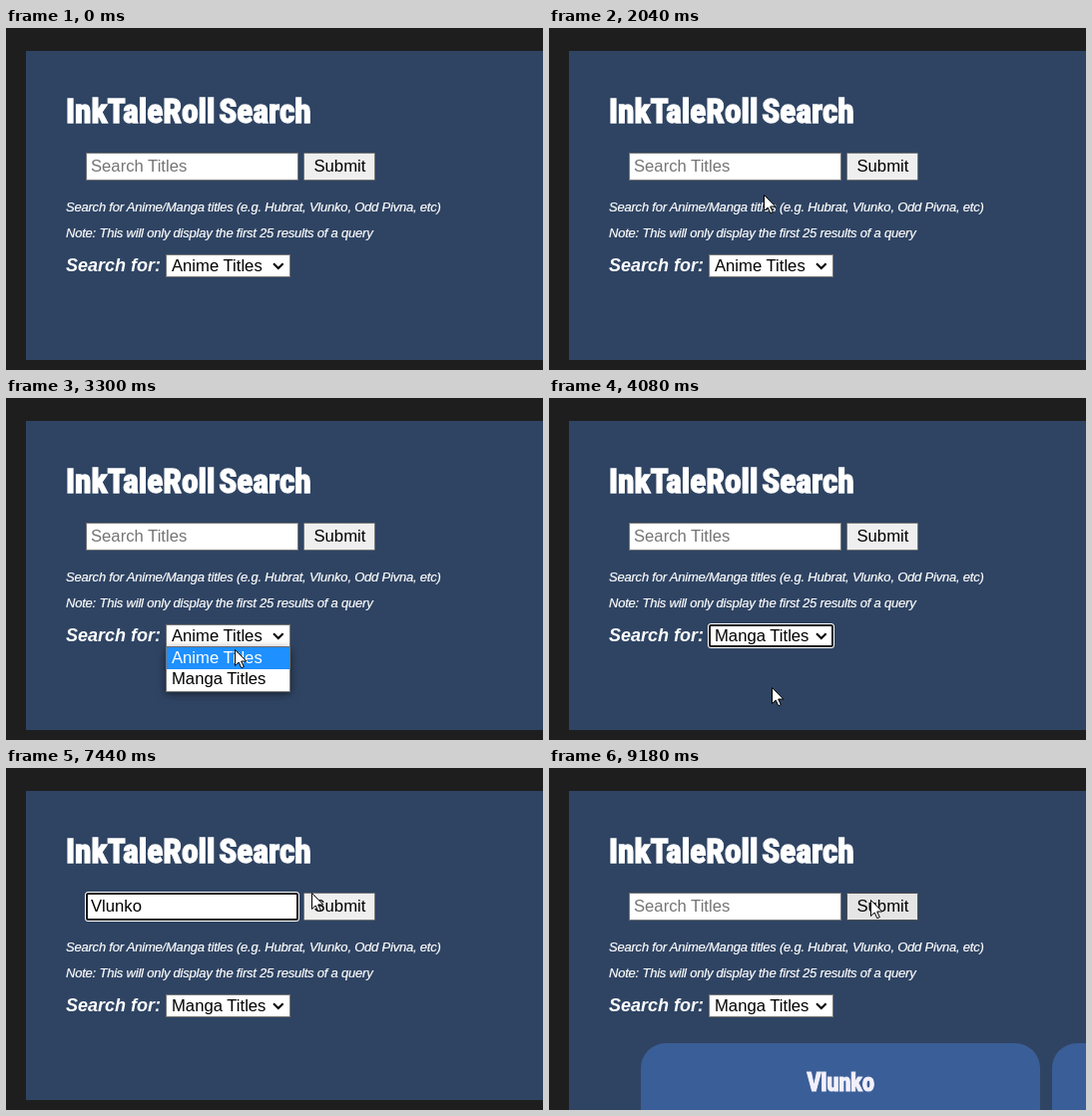
Animation of 538x343 px, one loop 9.54 s. Source, as an HTML page:

```html
<!DOCTYPE html>
<html lang="en">
<head>
<meta charset="utf-8">
<title>Search form</title>
<style>
  html, body { margin: 0; width: 100%; height: 100%; overflow: hidden; background: #1e1e1e; }
  svg { display: block; width: 538px; height: 343px; }
  text { font: 16.67px "Liberation Sans", Arial, sans-serif; white-space: pre; }
  .head { font: 900 33.5px "Roboto Condensed", Roboto, sans-serif; font-stretch: 75%;
    word-spacing: -4px; fill: #fff; stroke: #fff; stroke-width: 1.4px; }
  .card { font-size: 25px; letter-spacing: -.4px; text-anchor: middle;
    fill: #f3f0fd; stroke: #f3f0fd; stroke-width: 1px; }
  .note { font-size: 13px; font-style: italic; letter-spacing: -.21px;
    fill: #fff; stroke: #fff; stroke-width: .2px; }
  .label { font-size: 18px; font-style: italic; font-weight: bold; fill: #fff; }
  .field { fill: #fff; stroke: #767676; }
  .shadow { filter: drop-shadow(0 2px 4px rgba(0, 0, 0, .5)); }
</style>
</head>
<body>
<svg viewBox="0 0 538 343">
  <rect width="538" height="343" fill="#1e1e1e"/>
  <rect id="panel" x="20" y="23" width="518" height="310" fill="#2f4463"/>
  <text class="head" x="60" y="95">InkTaleRoll Search</text>

  <rect id="input" class="field" x="80.5" y="125.5" width="212" height="27"/>
  <g id="inputRing">
    <rect x="79" y="124" width="215" height="30" rx="3.5" fill="#fff"/>
    <rect x="81" y="126" width="211" height="26" rx="1.5" fill="#fff" stroke="#101010" stroke-width="2"/>
  </g>
  <text id="hint" x="85" y="144" fill="#757575">Search Titles</text>
  <text id="typed" x="85" y="144"></text>
  <rect id="caret" x="85" y="130" width="1" height="19"/>

  <rect id="button" class="field" x="298.5" y="125.5" width="71" height="27" rx="1"/>
  <text x="308.5" y="144">Submit</text>

  <text class="note" x="60" y="184">Search for Anime/Manga titles (e.g. Hubrat, Vlunko, Odd Pivna, etc)</text>
  <text class="note" x="60" y="210">Note: This will only display the first 25 results of a query</text>
  <text class="label" x="60" y="244">Search for:</text>

  <rect class="field" x="160.5" y="227.5" width="124" height="22"/>
  <g id="selectRing">
    <rect x="159" y="226" width="127" height="25" rx="3.5" fill="#fff"/>
    <rect x="161" y="228" width="123" height="21" rx="1.5" fill="#fff" stroke="#101010" stroke-width="2"/>
  </g>
  <text id="choice" x="166" y="244">Anime Titles</text>
  <path d="M268 236.2l4.8 4.8 4.8-4.8" fill="none" stroke="#000" stroke-width="2"/>

  <g id="popup">
    <rect class="shadow" x="160.5" y="250" width="124" height="44.5" fill="#fff" stroke="#767676"/>
    <rect id="mark" x="161" y="250" width="123" height="22" fill="#1e90ff"/>
    <text id="first" x="166" y="266">Anime Titles</text>
    <text id="second" x="166" y="287">Manga Titles</text>
  </g>

  <g id="cards">
    <g fill="#3a5e97">
      <rect x="92" y="276" width="400" height="120" rx="25"/>
      <rect x="504" y="276" width="400" height="120" rx="25"/>
    </g>
    <text class="head card" x="292" y="324">Vlunko</text>
  </g>

  <g id="cursor">
    <path id="arrow" d="M.5.5v16l3.7-3.5 2.6 5.7 2.5-1.1-2.6-5.6h5.1z" fill="#fff" stroke="#000"/>
    <path id="beam" d="M-3-6.5h3M1-6.5h3M.5-6v13M-3 7.5h3M1 7.5h3" fill="none" stroke="#000"/>
  </g>
</svg>
<script>
const LOOP = 9540, STEP = 60;
const $ = id => document.getElementById(id);
const set = (id, name, value) => $(id).setAttribute(name, value);
const show = (id, on) => { $(id).style.display = on ? '' : 'none'; };
const write = (id, text) => { if ($(id).textContent !== text) $(id).textContent = text; };
const ramp = (t, from, to) => Math.min(1, Math.max(0, (t - from) / (to - from)));
const smooth = k => k * k * (3 - 2 * k);

// time, x, y, eased arrival
const path = [
  [720, 523, 322], [780, 450, 296], [840, 392, 277],
  [1080, 392, 277], [1740, 211, 139, 1],
  [1920, 211, 139], [1980, 213, 150], [2040, 215, 167], [2400, 229, 267], [2640, 229, 244, 1],
  [3240, 229, 244], [3300, 229, 252], [3780, 223, 290, 1],
  [4260, 223, 290], [4800, 197, 146, 1],
  [7140, 197, 146], [7320, 260, 115, 1], [7440, 306, 125], [7680, 322, 132],
  [LOOP, 322, 132]
];
const word = 'Vlunko';
const keyTimes = [5700, 5880, 6000, 6180, 6420, 6660];

function pointer(t) {
  const i = Math.max(1, path.findIndex(p => p[0] > t));
  const a = path[i - 1], b = path[i];
  let k = ramp(t, a[0], b[0]);
  if (b[3]) k = smooth(k);
  return [a[1] + (b[1] - a[1]) * k, a[2] + (b[2] - a[2]) * k];
}

function draw(time) {
  const t = Math.floor(time % LOOP / STEP) * STEP;
  const within = (from, to) => t >= from && t < to;

  const [x, y] = pointer(t);
  const visible = t >= 720;
  const overInput = visible && x > 80 && x < 293 && y > 125 && y < 153;
  const overButton = visible && x > 298 && x < 370 && y > 125 && y < 153;
  show('cursor', visible);
  show('arrow', !overInput);
  show('beam', overInput);
  set('cursor', 'transform', `translate(${Math.round(x)} ${Math.round(y)})`);

  const text = t < 8040 ? word.slice(0, keyTimes.filter(k => k <= t).length) : '';
  write('typed', text);
  show('hint', !text);
  show('inputRing', within(5040, 7980));
  $('input').style.stroke = overInput ? '#4f4f4f' : '';
  show('caret', within(5040, 5520) || within(5700, 7200));
  set('caret', 'x', 85 + Math.round(text ? $('typed').getComputedTextLength() : 0));

  const pressed = within(7980, 8040);
  $('button').style.fill = pressed ? '#f5f5f5' : overButton ? '#e5e5e5' : '#efefef';
  $('button').style.stroke = pressed ? '#8d8d8d' : overButton ? '#4f4f4f' : '';

  const low = y >= 272;
  show('popup', within(2820, 4080));
  set('popup', 'opacity', ramp(t, 2760, 2940));
  set('mark', 'y', low ? 272 : 250);
  set('first', 'fill', low ? '#000' : '#fff');
  set('second', 'fill', low ? '#fff' : '#000');
  write('choice', t < 4080 ? 'Anime Titles' : 'Manga Titles');
  show('selectRing', within(4080, 5040));

  set('panel', 'height', t < 8700 ? 310 : 320);
  set('cards', 'opacity', ramp(t, 8640, 9180));
}

const start = performance.now();
function tick() {
  draw(performance.now() - start);
  requestAnimationFrame(tick);
}
tick();
</script>
</body>
</html>
```
